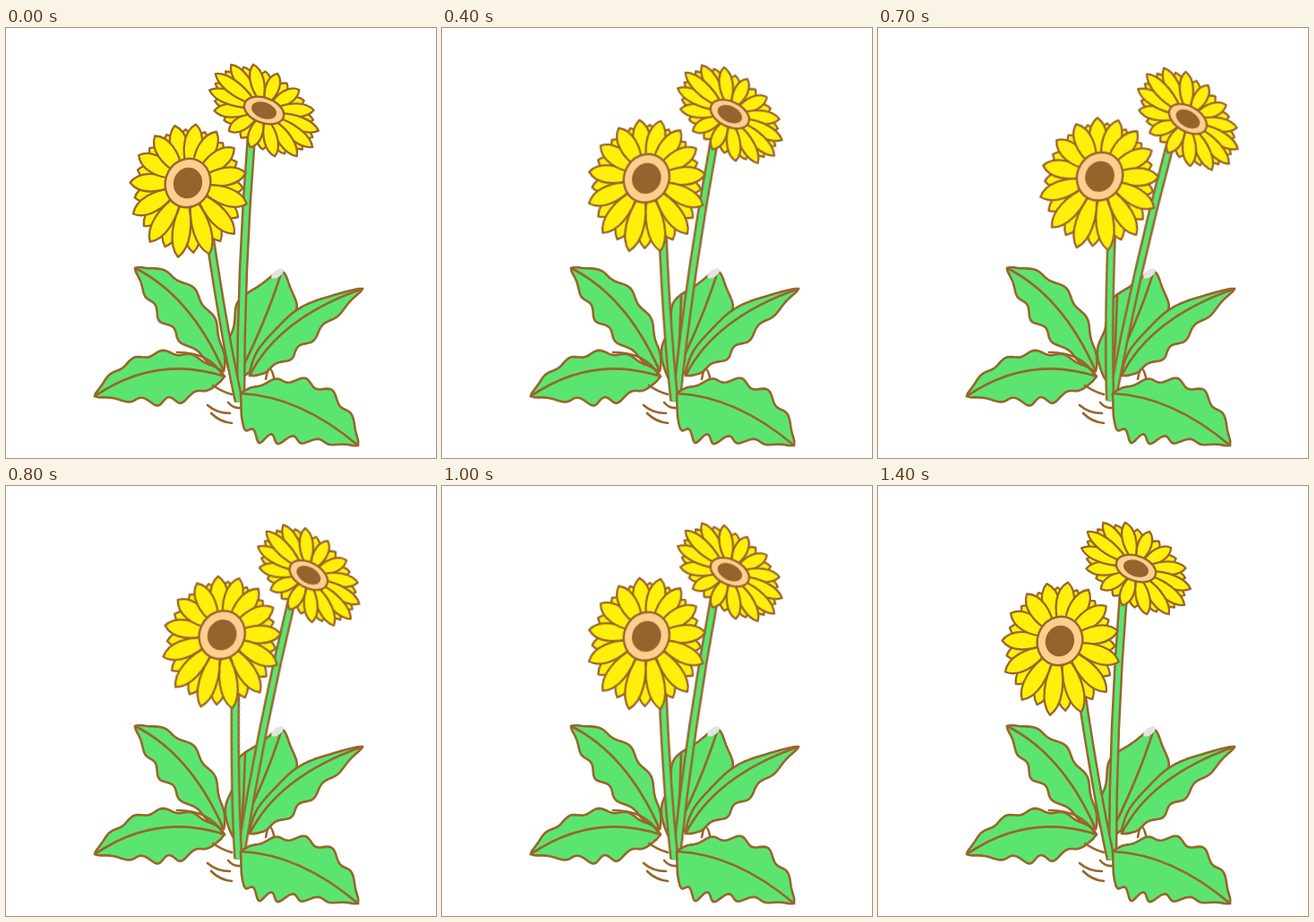
Animation, 480 px wide and 480 px high, one loop 1.5 s. Source, as an HTML page:

```html
<!DOCTYPE html>
<html lang="en">
<head>
<meta charset="utf-8">
<title>Swaying flowers</title>
<style>
  html, body { margin: 0; width: 100%; height: 100%; overflow: hidden; background: #fff; }
  svg { display: block; width: 100vw; height: 100vh; }
  path, ellipse { fill: none; stroke: #98652c; stroke-width: 2.6; stroke-linejoin: round; }
  .leaf { fill: #5be570; }
  .vein { stroke-linecap: round; }
  .petal { fill: #ffef0a; stroke-width: 2.3; }
  .ring { fill: #fccf8e; stroke-width: 2.4; }
  .disc { fill: #94642c; stroke: none; }
  .rind { stroke-width: 10.5; }
  .pith { stroke: #5be570; stroke-width: 5.5; }
  .glint { fill: #e2e4de; stroke: none; }
  /* seven steps out, then back again; the last value is never held */
  #sway { transform-origin: 265px 412px; animation: sway 1.5s infinite; }
  @keyframes sway {
    0% { transform: rotate(0deg); animation-timing-function: steps(7, end); }
    46.666% { transform: rotate(10.5deg); animation-timing-function: steps(8, end); }
    100% { transform: rotate(-1.5deg); }
  }
</style>
</head>
<body>
<svg viewBox="0 0 480 480">
  <g id="back"></g>
  <g id="sway"></g>
  <g id="front"></g>
</svg>
<script>
const [back, sway, front] = ['back', 'sway', 'front'].map(id => document.getElementById(id));
const rad = Math.PI / 180;

function add(parent, tag, cls, attrs) {
  const el = document.createElementNS('http://www.w3.org/2000/svg', tag);
  el.setAttribute('class', cls);
  for (const key in attrs) el.setAttribute(key, attrs[key]);
  parent.appendChild(el);
}

const path = (parent, cls, d) => add(parent, 'path', cls, { d });
const bend = (parent, cls, from, via, to) => path(parent, cls, `M${from}Q${via} ${to}`);

function oval(parent, cls, [x, y], [rx, ry], tilt) {
  add(parent, 'ellipse', cls, { cx: x, cy: y, rx, ry, transform: `rotate(${tilt} ${x} ${y})` });
}

// A curved midrib with a wavy blade; each side has a width, a skew and a lobe count.
function leaf(parent, base, via, tip, right, left) {
  const edge = (t, side, { width, skew = 1, lobes = 4 }) => {
    const at = k => (1 - t) ** 2 * base[k] + 2 * t * (1 - t) * via[k] + t * t * tip[k];
    const slope = k => (1 - t) * (via[k] - base[k]) + t * (tip[k] - via[k]);
    const [dx, dy] = [slope(0), slope(1)];
    const swell = Math.max(0, Math.sin(Math.PI * t ** skew)) ** .75;
    const wave = 1 + .13 * Math.sin(2 * Math.PI * lobes * t);
    const off = side * width * swell * wave / Math.hypot(dx, dy);
    return [at(0) - dy * off, at(1) + dx * off].map(v => v.toFixed(1));
  };
  const steps = 60, points = [];
  for (let i = 0; i <= steps; i++) points.push(edge(i / steps, 1, right));
  for (let i = steps; i >= 0; i--) points.push(edge(i / steps, -1, left));
  path(parent, 'leaf', `M${points.join('L')}Z`);
  bend(parent, 'vein', base, via, tip);
}

function stem(...points) {
  bend(sway, 'rind', ...points);
  bend(sway, 'pith', ...points);
}

function petal([cx, cy], [x, y], half) {
  const dx = (x - cx) * .75, dy = (y - cy) * .75, len = Math.hypot(dx, dy);
  const pt = (t, w) => `${x - dx * (1 - t) - dy / len * w},${y - dy * (1 - t) + dx / len * w}`;
  path(sway, 'petal', `M${pt(0, 3)}C${pt(.35, half)} ${pt(.8, half * 1.1)} ${x},${y}` +
    `C${pt(.8, -half * 1.1)} ${pt(.35, -half)} ${pt(0, -3)}Z`);
}

// Petal tips lie on an ellipse; "lean" spreads them apart towards one end.
function flower({ eye, mid = eye, reach, turn, start, lean, half, ring, disc }) {
  const count = 14, c = Math.cos(turn * rad), s = Math.sin(turn * rad);
  const row = (shift, scale) => {
    for (let i = 0; i < count; i++) {
      const a = start * rad + (i + shift) * 2 * Math.PI / count;
      const t = a - lean * Math.cos(a);
      const u = reach[0] * scale * Math.cos(t), v = reach[1] * scale * Math.sin(t);
      petal(eye, [mid[0] + u * c - v * s, mid[1] + u * s + v * c], half);
    }
  };
  row(.5, .92);
  row(0, 1);
  oval(sway, 'ring', eye, ring, 20);
  oval(sway, 'disc', eye, disc, 20);
}

leaf(back, [256, 395], [290, 329], [308, 271],
  { width: 29, skew: 1.3, lobes: 3 }, { width: 33, skew: .9, lobes: 2 });
oval(back, 'glint', [303, 274], [8, 4], -35);
leaf(back, [272, 388], [304, 324], [398, 291],
  { width: 26, skew: .85 }, { width: 10, lobes: 2 });
leaf(back, [243, 383], [206, 299], [144, 268],
  { width: 20 }, { width: 28 });
bend(back, 'vein', [267, 299], [266, 345], [262, 390]);
bend(back, 'vein', [290, 392], [294, 370], [299, 390]);

stem([262, 418], [262, 270], [274, 120]);
flower({
  eye: [288, 92], reach: [68, 43], turn: 35, start: -151, lean: 0,
  half: 9, ring: [23, 14], disc: [14.5, 9]
});
stem([260, 417], [241, 330], [222, 195]);
flower({
  eye: [203, 173], mid: [204, 182], reach: [66, 75], turn: 0, start: -107, lean: .2,
  half: 12, ring: [25, 27.5], disc: [16, 17.5]
});

leaf(front, [244, 389], [168, 364], [99, 411],
  { width: 19, lobes: 5 }, { width: 36, skew: .85 });
bend(front, 'vein', [191, 362], [228, 362], [242, 388]);
leaf(front, [262, 408], [328, 411], [393, 466],
  { width: 46, skew: .5, lobes: 5 }, { width: 31, skew: 1.25, lobes: 5 });

// Roots
bend(front, 'vein', [225, 421], [235, 430], [250, 430]);
bend(front, 'vein', [229, 430], [239, 440], [252, 441]);
bend(front, 'vein', [248, 418], [254, 425], [262, 424]);
bend(front, 'vein', [231, 399], [241, 406], [252, 409]);
</script>
</body>
</html>
```
